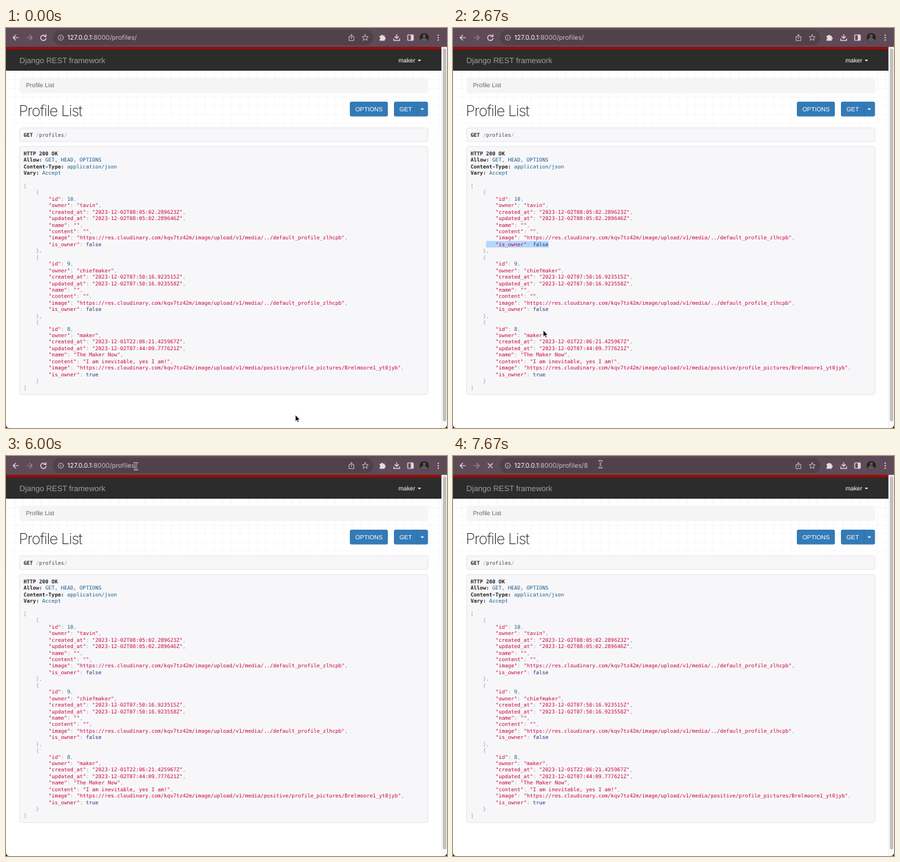
Animation of 640 by 581 pixels, one loop 8000 ms. Source, as an HTML page:

```html
<!DOCTYPE html>
<html lang="en">
<head>
<meta charset="utf-8">
<title>Profile List</title>
<style>
html, body { margin: 0; width: 100%; height: 100%; overflow: hidden; background: #fff; }
svg { display: block; width: 640px; height: 581px; }
text { text-rendering: geometricPrecision; white-space: pre; font: 8.8px "Liberation Sans", Arial, sans-serif; }
.mono, .mono text { font: 7.53px "DejaVu Sans Mono", monospace; fill: #48484c; }
.mono .b { font-weight: bold; fill: #222; }
.mono .str { fill: #c8073f; }
.mono .lit { fill: #195f91; }
.mono .kwd { fill: #1e347b; }
.mono .pun { fill: #93a1a1; }
.url, .url text { font: 9.3px Inter, "Open Sans", sans-serif; fill: #c9bfc5; }
.url .host { fill: #fff; }
.brand { font-size: 11.3px; fill: #9d9d9d; }
.title { font: 200 22px Inter, Roboto, sans-serif; letter-spacing: -1px; fill: #222; }
.btn { fill: #337ab7; }
.well { fill: #f7f7f9; stroke: #e1e1e8; stroke-width: .8; }
.icon { fill: none; stroke: #e4dce1; stroke-width: 1.2; stroke-linecap: round; stroke-linejoin: round; }
.thin { stroke: #cfc5cb; stroke-width: .9; }
</style>
</head>
<body>
<svg id="stage" viewBox="0 0 640 581">
  <defs>
    <pattern id="grid" width="12.56" height="12.56" patternUnits="userSpaceOnUse" y="62">
      <path d="M.5 0V12.56M0 .5H12.56" stroke="#f1f1f1" stroke-width=".8"/>
    </pattern>
    <linearGradient id="fade" x2="0" y2="1">
      <stop offset="0" stop-color="#fff" stop-opacity="0"/>
      <stop offset="1" stop-color="#fff"/>
    </linearGradient>
  </defs>

  <!-- page -->
  <rect width="640" height="581" fill="#fff"/>
  <rect y="62" width="632" height="140" fill="url(#grid)"/>
  <rect y="62" width="632" height="140" fill="url(#fade)"/>
  <rect y="27" width="632" height="35" fill="#2c2c2c"/>
  <rect y="27.5" width="632" height="3.5" fill="#a90000"/>
  <text class="brand" x="19.5" y="50.8">Django REST framework</text>
  <text x="569.5" y="50" fill="#fff">maker</text>
  <path d="M597.5 46h5l-2.5 2.6z" fill="#fff"/>
  <rect x="19.5" y="72" width="593" height="22.5" rx="2.5" fill="#f5f5f5"/>
  <text x="29" y="86.4" fill="#666">Profile List</text>
  <text class="title" x="18.5" y="128.3">Profile List</text>
  <rect class="btn" x="499" y="107" width="55.2" height="21.6" rx="2.5"/>
  <text x="507" y="121.2" fill="#fff">OPTIONS</text>
  <rect class="btn" x="563" y="107" width="49.4" height="21.6" rx="2.5"/>
  <path d="M596.8 107v21.6" stroke="#2e6da4" stroke-width=".8"/>
  <text x="571" y="121.2" fill="#fff">GET</text>
  <path d="M601.7 116.8h5l-2.5 2.6z" fill="#fff"/>
  <rect class="well" x="19.8" y="145" width="592.5" height="20" rx="2.5"/>
  <rect class="well" x="19.8" y="172" width="592.5" height="360.3" rx="2.5"/>
  <g id="marks" fill="#b3d7fe"></g>
  <text class="mono" x="25.4" y="157.6"><tspan class="b">GET</tspan> <tspan class="pun">/</tspan>profiles<tspan class="pun">/</tspan></text>
  <g id="body" class="mono"></g>

  <!-- scrollbar and window corners -->
  <rect x="632" y="27" width="8" height="554" fill="#fafafa"/>
  <path d="M632.3 27V581" stroke="#e6e6e6" stroke-width=".7"/>
  <rect x="634" y="29.5" width="5" height="542" rx="2.5" fill="#c1c1c1"/>
  <path d="M0 576Q0 581 5 581H0zM640 576Q640 581 635 581H640z" fill="#111"/>

  <!-- toolbar -->
  <rect width="640" height="27.5" fill="#5e4b57"/>
  <g class="icon">
    <path d="M18 14h-7.5m3.5-3.6L10.4 14l3.6 3.6"/>
    <path d="M30.5 14H38m-3.5-3.6L38.1 14l-3.6 3.6" stroke="#968892"/>
    <path id="reload" d="M57.2 11.7a3.9 3.9 0 1 0 .9 3.1M58 9.6v2.9h-2.9"/>
    <path id="stop" d="M51 11l6.2 6.2M57.2 11L51 17.2"/>
  </g>
  <g id="menu">
    <path d="M62 0H540V113Q540 119 534 119H68Q62 119 62 113z" fill="#2b2127"/>
    <rect x="62" y="29" width="478" height="28" fill="#4a3c44"/>
    <g class="icon thin">
      <circle cx="79" cy="43" r="3.6"/><circle cx="79" cy="72" r="3.6"/><circle cx="79" cy="101" r="3.6"/>
    </g>
    <g class="url">
      <text x="89" y="46.2">127.0.0.1:8000/profiles/8</text>
      <text x="89" y="75.2">127.0.0.1:8000/profiles/</text>
      <text x="89" y="104.2">127.0.0.1:8000</text>
    </g>
  </g>
  <rect id="pill" x="68" y="3" width="465" height="22" rx="11" stroke-width="1.5"/>
  <g class="icon thin">
    <circle cx="79.5" cy="14" r="3.7"/><path d="M79.5 13.8v1.8M79.5 12.1v.1"/>
    <path d="M499.7 12.5h-1.9v5.8h7v-5.8h-1.9M501.3 15.5V9.6m-1.8 1.7l1.8-1.8 1.8 1.8"/>
    <path d="M521.3 9.6l1.3 2.9 3.1.3-2.3 2.1.7 3.1-2.8-1.7-2.8 1.7.7-3.1-2.3-2.1 3.1-.3z"/>
  </g>
  <g class="icon">
    <path d="M567 9.5v5.4m-2.6-2.4l2.6 2.6 2.6-2.6M562.8 15.5v2.7h8.4v-2.7"/>
    <rect x="583" y="10" width="8" height="8" rx=".8"/>
  </g>
  <path d="M542.2 11.2h2.2a1.5 1.5 0 0 1 3 0h2.2v2.3a1.5 1.5 0 0 1 0 3v2h-7.4v-2.2a1.5 1.5 0 0 0 0-2.8zM587.5 10h3.5v8h-3.5z" fill="#e4dce1"/>
  <circle cx="607" cy="14" r="6.6" fill="#242124"/>
  <path d="M601.7 17.8q1.8-4.3 5.3-3.7t5.2 3.7a6.6 6.6 0 0 1-10.5 0z" fill="#5d5856"/>
  <circle cx="607" cy="11.6" r="2.3" fill="#5d5856"/>
  <g fill="#e4dce1"><circle cx="627.3" cy="10.4" r="1"/><circle cx="627.3" cy="14" r="1"/><circle cx="627.3" cy="17.6" r="1"/></g>
  <rect id="urlMark" x="89" y="8" width="100" height="12" fill="#4f78b8"/>
  <text class="url" x="89" y="17.2"><tspan class="host">127.0.0.1</tspan>:8000/profiles/<tspan id="typed"></tspan></text>
  <path id="caret" d="M189.2 8.3V19" stroke="#fff" stroke-width="1"/>

  <!-- pointer -->
  <g id="pointer">
    <g id="ring" fill="none">
      <circle r="10.4" stroke="#fff" stroke-width="2" stroke-opacity=".7"/>
      <circle r="10" stroke="#111" stroke-width="1.1"/>
    </g>
    <g id="beam" fill="none" stroke-linecap="round">
      <path d="M-2-5Q0-5 0-3.6Q0-5 2-5M0-3.6V3.6M-2 5Q0 5 0 3.6Q0 5 2 5" stroke="#fff" stroke-width="2.2"/>
      <path d="M-2-5Q0-5 0-3.6Q0-5 2-5M0-3.6V3.6M-2 5Q0 5 0 3.6Q0 5 2 5" stroke="#111" stroke-width="1"/>
    </g>
    <path id="arrow" d="M0 0V9.4L2.1 7.5 3.7 11 5.2 10.3 3.7 7H6.6z" fill="#000" stroke="#fff" stroke-width=".7"/>
  </g>
</svg>

<script>
const LOOP = 8000;
const LEFT = 25.4, COL = 4.533, TOP = 182, ROW = 9.44;
const $ = id => document.getElementById(id);

function add(parent, tag, attrs, text = '') {
  const el = document.createElementNS('http://www.w3.org/2000/svg', tag);
  for (const k in attrs) el.setAttribute(k, attrs[k]);
  el.textContent = text;
  return parent.appendChild(el);
}

// Response text
const media = 'https://res.cloudinary.com/kqv7tz42m/image/upload/v1/media/';
const blank = '../default_profile_zlhcpb';
const profiles = [
  { id: 10, owner: 'tavin', created_at: '2023-12-02T08:05:02.289623Z', updated_at: '2023-12-02T08:05:02.289646Z',
    name: '', content: '', image: media + blank, is_owner: false },
  { id: 9, owner: 'chiefmaker', created_at: '2023-12-02T07:50:16.923515Z', updated_at: '2023-12-02T07:50:16.923558Z',
    name: '', content: '', image: media + blank, is_owner: false },
  { id: 8, owner: 'maker', created_at: '2023-12-01T22:06:21.425967Z', updated_at: '2023-12-02T07:44:09.777621Z',
    name: 'The Maker Now', content: 'I am inevitable, yes I am!',
    image: media + 'positive/profile_pictures/Brelmoore1_yt0jyb', is_owner: true }
];
const head = [['HTTP 200 OK', ''], ['Allow:', ' GET, HEAD, OPTIONS'],
  ['Content-Type:', ' application/json'], ['Vary:', ' Accept']];

function line(row, indent = 0) {
  return add($('body'), 'text', { x: LEFT + indent * COL, y: TOP + row * ROW + 2.7 });
}

function kind(token) {
  if (token[0] === '"') return 'str';
  if (/^\d/.test(token)) return 'lit';
  return /^[tf]/.test(token) ? 'kwd' : 'pun';
}

head.forEach(([key, value], row) => {
  const el = line(row);
  add(el, 'tspan', { class: 'b' }, key);
  add(el, 'tspan', { class: 'lit' }, value);
});
JSON.stringify(profiles, null, 4).split('\n').forEach((source, i) => {
  const el = line(i + 5, source.search(/\S/));
  for (const token of source.trim().match(/"[^"]*"|\w+|\s+|[^\w\s"]/g))
    add(el, 'tspan', { class: kind(token) }, token);
});

// Text selections: from, to, row, first column, last column
const marks = [
  [670, 1000, 34, 8, 24], [1000, 1330, 34, 0, 24],
  [1330, 2000, 24, 7, 25],
  [2000, 2330, 14, 13, 25], [2330, 3000, 14, 5, 25],
  [3330, 4330, 27, 8, 17], [3330, 4330, 28, 0, 25]
].map(([from, to, row, a, b]) => ({ from, to, el: add($('marks'), 'rect', {
  x: LEFT + a * COL, y: TOP + row * ROW - 4.8, width: (b - a) * COL, height: ROW
}) }));

// Pointer: time, look, x, y
const moves = [
  [0, 'arrow', 420, 562], [330, 'beam', 62, 500], [670, 'press', 64.5, 499.5],
  [1000, 'beam', 140, 409], [1330, 'press', 58.5, 409], [1670, 'beam', 140, 330],
  [2000, 'press', 84, 311], [2330, 'beam', 50, 311], [2670, 'arrow', 131, 439],
  [3000, 'press', 137, 447], [3330, 'press', 62.5, 447], [3670, 'beam', 81, 443],
  [4000, 'arrow', 445, 167], [4330, 'arrow', 263, 296], [4670, 'arrow', 80, 424],
  [5000, 'none', 0, 0], [5670, 'arrow', 493, 79], [6000, 'beam', 188.5, 15], [6330, 'beam', 214, 12]
];

const show = (el, on) => { el.style.display = on ? '' : 'none'; };

function draw(t) {
  const within = (from, to) => t >= from && t < to;
  const [, look, x, y] = moves.findLast(m => m[0] <= t);
  $('pointer').setAttribute('transform', `translate(${x} ${y})`);
  show($('arrow'), look === 'arrow');
  show($('beam'), look === 'beam' || look === 'press');
  show($('ring'), look === 'press');
  for (const m of marks) show(m.el, within(m.from, m.to));

  const focus = within(6330, 7670), menu = within(7330, 7670);
  $('pill').setAttribute('fill', focus ? '#2b2127' : '#514149');
  $('pill').setAttribute('stroke', focus && !menu ? '#a0c3f7' : 'none');
  show($('menu'), menu);
  show($('urlMark'), within(6330, 6670));
  show($('caret'), within(6670, 7000));
  $('typed').textContent = t >= 7330 ? '8' : '';
  show($('reload'), t < 7670);
  show($('stop'), t >= 7670);
}

const start = performance.now();
function tick() {
  draw((performance.now() - start) % LOOP);
  requestAnimationFrame(tick);
}
tick();
</script>
</body>
</html>
```
